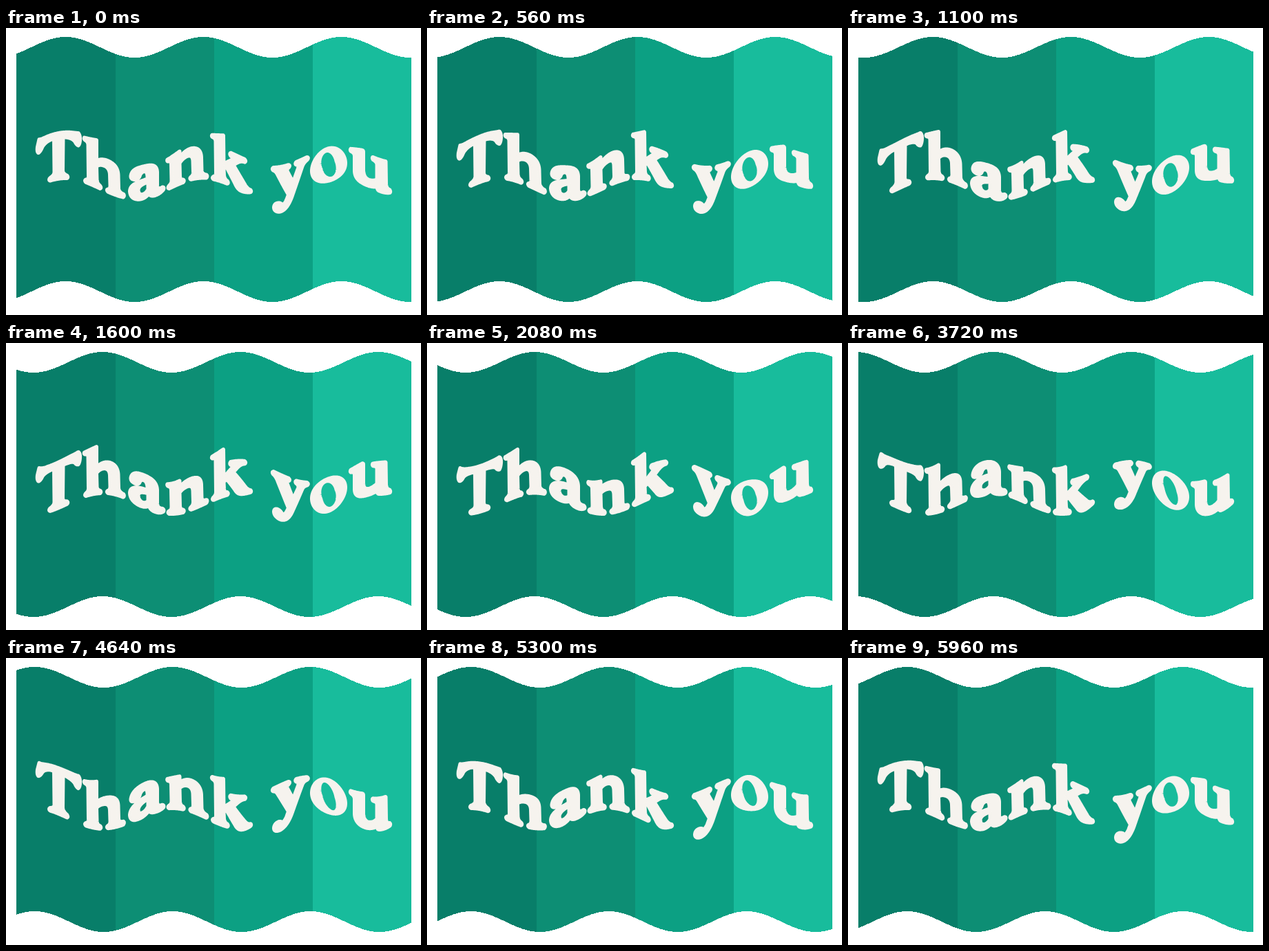
Recreate the animation shown at these times as an HTML page with a canvas. Size 602 by 417 pixels, loop 5980 ms.

```html
<!DOCTYPE html>
<html lang="en">
<head>
<meta charset="utf-8">
<title>Thank you</title>
<style>
  html, body { margin: 0; width: 100%; height: 100%; overflow: hidden; background: #fff; }
  canvas { display: block; width: 602px; height: 417px; }
</style>
</head>
<body>
<canvas id="stage" width="602" height="417" role="img" aria-label="Thank you"></canvas>
<script>
const LOOP = 5980, STEP = 20;
const WAVE = { length: 200, height: 15, crest: 86.5 };
const TOP = 28, HEIGHT = 355;
const EDGES = [15, 159, 302, 445, 588];
const GREENS = ['#087e69', '#0d8e74', '#0ca083', '#18bc9c'];
const INK = '#f6f3ee';
const ROUNDING = 5; // the outlines are inset by half of this

// Letter h or n: the same arch, with the stem starting at a given height
const arch = (x, top) => `M${x} ${top} q8.5 -1 18 -4 L${x + 18} 195
  q7.5 -7.5 17 -7.5 q14 .5 14.5 15.5 l.5 19.5 q1 5 7 5.5 q2 2.5 -.5 5 l-22 0
  q-3 -2 -.5 -4 q3.5 -1.5 3.5 -6.5 l-.5 -16 q-.5 -9 -7.5 -9 q-7 .5 -11.5 6
  l.5 19.5 q.5 5 4.5 6 q2.5 2.5 0 4.5 l-20.5 0 q-3 -2 0 -4.5 q3.5 -1.5 3.5 -6
  L${x + 5.5} ${top + 9} q0 -5 -4.5 -5.5 q-2 -1.5 -1 -3.5Z`;

const LETTERS = [
  // T
  [`M48 167 Q52 168.5 60 167.5 L94 166 Q101 166 105 165 Q108 168 107.5 175
    Q107 181 105 183.5 Q102 183 100 179 Q96 174 83 174 L82.5 222 Q83 227 88.5 229
    Q91 232 88.5 233.5 L64 233.5 Q61 231.5 64 229 Q70 227 70 222 L69.5 174
    Q58 174 53 180 Q50 186 47 186.5 Q44.5 184 45.5 177Z`],
  // h
  [arch(113.5, 169)],
  // a
  [`M181 200 Q183 187 202 187 Q219 187 219.5 202 L219.5 221 Q220 228 227 226.5
    Q230 228 228.5 231 Q224 235 216 234.5 Q209 234 207.5 229 Q201 235 193 234.5
    Q180 234 179.5 222.5 Q180 209 205 206.5 L205 203 Q204.5 195 200 195
    Q195.5 195.5 194 201 Q191.5 206 186 205.5 Q180.5 205 181 200Z`,
   'M206 211.5 Q192 213.5 192 221 Q192.5 227.5 198 227.5 Q203 227 206 222Z'],
  // n
  [arch(234, 190)],
  // k
  [`M299 169 Q307 168 315.5 165 L316 206 L328 195 Q330 192 326 191
    Q323.5 188.5 326 186 L346 186 Q349 188 346.5 190.5 Q341 191 336 196 L330 202
    L347 223 Q351 227.5 355 227 Q357 230 353 231.5 Q344 235.5 339 234.5
    Q335 233.5 332 228 L320 210 L316 213 L316.5 223 Q317 228 321 229
    Q323.5 231.5 321 233.5 L301 233.5 Q298 231.5 301 229 Q304.5 227.5 304.5 223
    L304 178 Q304 173 299.5 172.5 Q297.5 171 299 169Z`],
  // y
  [`M388 187.5 L410 187.5 Q413 189.5 410 192 Q407 193 408.5 197 L416.5 215
    L423.5 198 Q425 193.5 421 192 Q418.5 189.5 421 187.5 L436.5 187.5
    Q440 189.5 437 192 Q432 193.5 430 198 L416 233 Q408.5 253 396.5 253
    Q388.5 252 388.5 245.5 Q389 239.5 395 239.5 Q399 240 400.5 243
    Q404 243.5 407 237 L409.5 231 L393.5 198 Q391 193 387.5 192
    Q385 189.5 388 187.5Z`],
  // o
  ['M443.5 211 A24.5 23.7 0 1 0 492.5 211 A24.5 23.7 0 1 0 443.5 211Z',
   'M457 214.2 A11.6 18.5 -17 1 0 479 207.8 A11.6 18.5 -17 1 0 457 214.2Z'],
  // u
  [`M500 189 Q508 188 517 186 Q518.5 186 518.5 188 L518.5 215 Q519 225 526 225
    Q532.5 224.5 538 219 L538 198 Q538 194 532.5 193.5 Q530.5 191.5 532 189.5
    Q542 189 551 187 L551.5 220 Q552 226 556.5 226 Q558.5 228 557 230.5
    Q549 234.5 541 234.5 Q538.5 234.5 538 230 Q530 235 521 234.5
    Q506 234 505.5 220 L505.5 199 Q505.5 194 500.5 193 Q498.5 191.5 500 189Z`]
];

// Turn an outline into closely spaced points that can be bent
function flatten(d) {
  const path = document.createElementNS('http://www.w3.org/2000/svg', 'path');
  path.setAttribute('d', d);
  const length = path.getTotalLength(), points = [];
  for (let s = 0; s < length; s += 0.8) points.push(path.getPointAtLength(s));
  return points;
}

const letters = LETTERS.map(outlines => outlines.map(flatten));

const ctx = document.getElementById('stage').getContext('2d');
ctx.lineJoin = 'round';
ctx.lineWidth = ROUNDING;
ctx.strokeStyle = INK;

const lift = (x, crest) => WAVE.height * Math.cos(2 * Math.PI * (x - crest) / WAVE.length);

// Whole-pixel columns keep the flag's edge hard
function drawBand(left, right, color, crest) {
  ctx.fillStyle = color;
  for (let x = left; x < right; x++) {
    ctx.fillRect(x, Math.round(TOP - lift(x + 0.5, crest)), 1, HEIGHT);
  }
}

function drawLetter(outlines, crest) {
  const shape = new Path2D();
  for (const points of outlines) {
    points.forEach(({ x, y }, i) => shape[i ? 'lineTo' : 'moveTo'](x, y - lift(x, crest)));
    shape.closePath();
  }
  ctx.fillStyle = INK;
  ctx.fill(shape, 'evenodd');
  ctx.stroke(shape);
}

function draw(time) {
  const crest = WAVE.crest + WAVE.length * time / LOOP;
  ctx.fillStyle = '#fff';
  ctx.fillRect(0, 0, 602, 417);
  GREENS.forEach((color, i) => drawBand(EDGES[i], EDGES[i + 1], color, crest));
  letters.forEach(outlines => drawLetter(outlines, crest));
}

const start = performance.now();
function tick() {
  const time = (performance.now() - start) % LOOP;
  draw(Math.floor(time / STEP) * STEP);
  requestAnimationFrame(tick);
}
tick();
</script>
</body>
</html>
```
